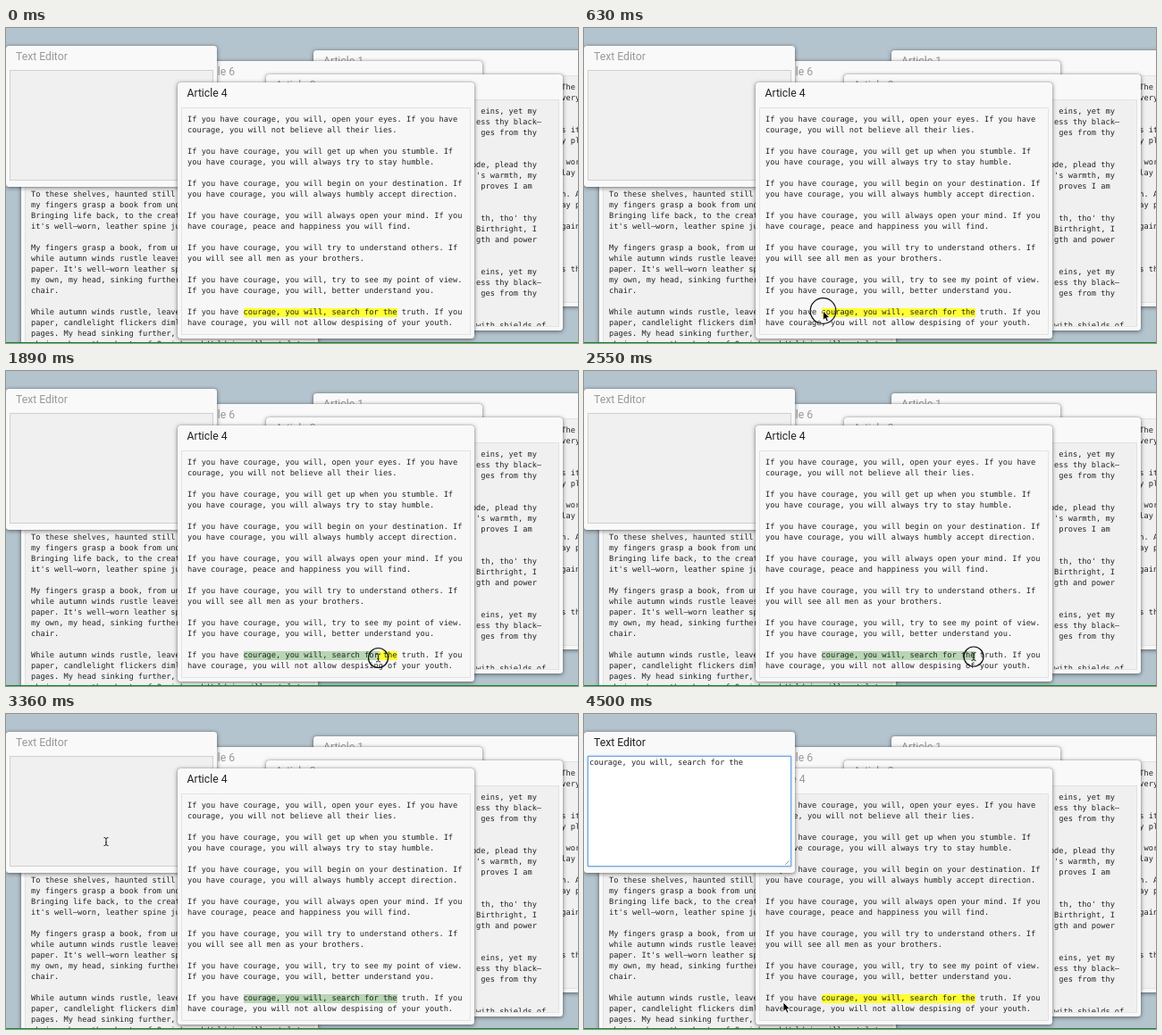
Write an HTML page that moves like this. It is 640x353 px and loops after 4.53 s.

```html
<!DOCTYPE html>
<html lang="en">
<meta charset="utf-8">
<title>Dragging text between windows</title>
<style>
html, body { margin: 0; width: 100%; height: 100%; overflow: hidden; }
body { position: relative; background: #b4c4ce; }
.win {
  position: absolute; box-sizing: border-box; width: 332.5px; height: 287px;
  background: #f9f9f9; border-radius: 3px;
  box-shadow: 0 1px 5px rgba(0,0,0,.5), 0 0 1px rgba(0,0,0,.5);
  color: #999; font: 12.2px/25px Roboto, sans-serif;
}
.win h1 { position: absolute; left: 11px; top: 0; margin: 0; font: inherit; white-space: nowrap; }
.win.active { color: #222; }
.pane {
  position: absolute; left: 4px; right: 4px; top: 28px; bottom: 4px; margin: 0;
  box-sizing: border-box; border: 1px solid #e2e2e2; padding: 7px 0 0 6.5px; overflow: hidden;
  background: #f0f0f0; color: #222; white-space: pre; text-rendering: geometricPrecision;
  font: 8.667px/12px "DejaVu Sans Mono", monospace;
}
.active .pane { background: #f7f7f7; }
mark { color: inherit; }
#editor { width: 235.5px; height: 158px; }
#editor .pane { padding: 1px 0 0 1px; top: 27.5px; bottom: 6.5px; border-color: #d0d0d0; }
#editor.active .pane { background: #fff; border-color: #6fa5dc; box-shadow: 0 0 2px #6fa5dc; }
#grip { position: absolute; right: 1px; bottom: 1px; width: 6px; height: 6px;
  background: repeating-linear-gradient(135deg, transparent 0 2px, #999 2px 2.7px);
  clip-path: polygon(100% 0, 100% 100%, 0 100%); }
svg { position: absolute; inset: 0; z-index: 20; }
#floor { position: absolute; left: 0; right: 0; top: 352px; height: 1px; background: #0c8f1c; z-index: 15; }
</style>
<body>
<div id="floor"></div>
<svg width="640" height="353">
  <g id="cursor">
    <circle id="ring" fill="none" stroke="#111" stroke-width="1.2"/>
    <path id="arrow" d="M0 0V10.5L2.4 8.3L4.1 12L5.9 11.2L4.3 7.6H7.4Z" fill="#000" stroke="#fff" stroke-width=".8"/>
    <path id="beam" d="M-2.5-4.5Q0-4.5 0-3Q0-4.5 2.5-4.5M0-3V3M-2.5 4.5Q0 4.5 0 3Q0 4.5 2.5 4.5M-1 1H1" fill="none" stroke="#222"/>
  </g>
</svg>
<script>
const LOOP = 4530, PHRASE = "courage, you will, search for the";
const $ = id => document.getElementById(id);
const indent = (n, text) => text.split("\n").map(line => " ".repeat(n) + line).join("\n");

function addWindow(id, title, x, y, text) {
  const win = document.createElement("div");
  win.className = "win";
  win.id = id;
  win.style.left = x + "px";
  win.style.top = y + "px";
  win.innerHTML = `<h1>${title}</h1><pre class="pane">${text}</pre>`;
  document.body.append(win);
  return win;
}

addWindow("article1", "Article 1", 344, 25, indent(51, `The sea
very tide


s it was
y place

 word of
lay peace

n. And so
ay pass

gain and



s the sun`));
addWindow("article6", "Article 6", 200, 37, "");
addWindow("article2", "Article 2", 290.5, 52, indent(42, `  eins, yet my
 ess thy black–
  ges from thy


ode, plead thy
 's warmth, my
  proves I am


  th, tho' thy
 Birthright, I
 gth and power


  eins, yet my
 ess thy black–
  ges from thy


 with shields of`));
addWindow("article3", "Article 3", 16.5, 145, `To these shelves, haunted still by time,
my fingers grasp a book from under dust.
Bringing life back, to the creatures in
it's well–worn, leather spine just so.

My fingers grasp a book, from under dust,
while autumn winds rustle leaves of the
paper. It's well–worn leather spine is
my own, my head, sinking further in the
chair.

While autumn winds rustle, leaves of the
paper, candlelight flickers dimly on the
pages. My head sinking further, in the
chair, where the ghosts of Ormick and Weldrin will not let`);
const article = addWindow("article4", "Article 4", 191.5, 61, `If you have courage, you will, open your eyes. If you have
courage, you will not believe all their lies.

If you have courage, you will get up when you stumble. If
you have courage, you will always try to stay humble.

If you have courage, you will begin on your destination. If
you have courage, you will always humbly accept direction.

If you have courage, you will always open your mind. If you
have courage, peace and happiness you will find.

If you have courage, you will try to understand others. If
you will see all men as your brothers.

If you have courage, you will, try to see my point of view.
If you have courage, you will, better understand you.

If you have <mark>${PHRASE}</mark> truth. If you
have courage, you will not allow despising of your youth.`);
const editor = addWindow("editor", "Text Editor", 0, 19.5, "");
const note = editor.querySelector("pre"), mark = article.querySelector("mark");
const grip = document.createElement("i");
grip.id = "grip";

// Pointer path: time, x, y
const path = [
  [150, 215, 366], [560, 267, 317], [700, 268, 317], [1350, 274, 317], [1420, 275, 317],
  [1890, 416.5, 321.5], [2250, 436, 320], [2680, 436, 320], [3250, 112, 143],
  [3980, 112, 143], [4500, 223, 323], [LOOP, 226, 326]
];
const presses = [[590, 2640], [3460, 3620]];
const ACTIVATE = 3500, PASTE = 3760;
const ease = u => u * u * (3 - 2 * u);

function pointer(t) {
  const i = path.findIndex(p => p[0] > t);
  if (i < 1) return path[0].slice(1);
  const [t0, x0, y0] = path[i - 1], [t1, x1, y1] = path[i];
  const u = ease((t - t0) / (t1 - t0));
  return [x0 + (x1 - x0) * u, y0 + (y1 - y0) * u];
}

function draw(t) {
  const [x, y] = pointer(t);
  const isArrow = t < 700 || t > 4120 || (t > 2840 && t < 3130);
  const press = presses.find(([a, b]) => t >= a && t < b);
  $("cursor").setAttribute("transform", `translate(${x} ${y})`);
  $("arrow").style.display = isArrow ? "" : "none";
  $("beam").style.display = isArrow ? "none" : "";
  $("ring").style.display = press ? "" : "none";
  if (press) $("ring").setAttribute("r", Math.max(11, 16 - (t - press[0]) / 25));

  const typing = t >= ACTIVATE;
  editor.classList.toggle("active", typing);
  article.classList.toggle("active", !typing);
  editor.style.zIndex = typing ? 2 : 0;
  article.style.zIndex = 1;
  note.textContent = t >= PASTE ? PHRASE : "";
  if (typing) note.append(grip);

  let selected = 0;
  if (t > 1420 && !typing)
    selected = t > 2250 ? PHRASE.length : Math.round((x - 265.5) / 5.22);
  const stop = selected / PHRASE.length * 100;
  mark.style.background = `linear-gradient(90deg, #b8d6b4 ${stop}%, #ffff32 0)`;
}

const start = performance.now();
function tick() {
  draw((performance.now() - start) % LOOP);
  requestAnimationFrame(tick);
}
tick();
</script>
</body>
</html>
```
